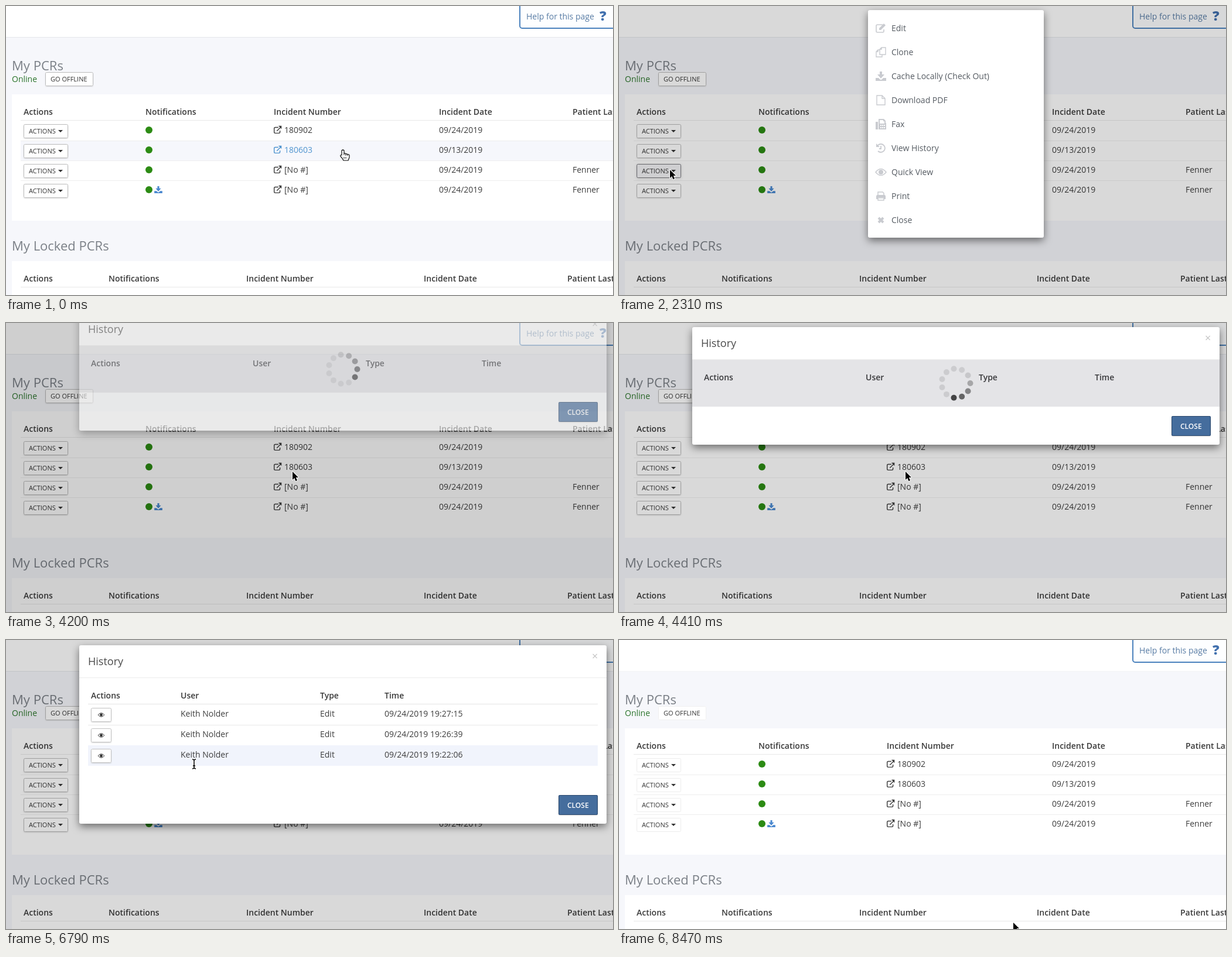
Recreate the animation shown at these times as an HTML page with a canvas. Size 1036 by 494 pixels, loop 8540 ms.

```html
<!DOCTYPE html>
<html lang="en">
<head>
<meta charset="utf-8">
<title>Record history</title>
<style>
html, body { margin: 0; width: 100%; height: 100%; overflow: hidden; background: #fff; }
canvas { display: block; }
</style>
</head>
<body>
<canvas id="stage" width="1036" height="494"></canvas>
<script>
const W = 1036, H = 494, LOOP = 8540;
const FONT = '"Open Sans", "Noto Sans", sans-serif';
const main = document.getElementById('stage').getContext('2d');
const layer = document.createElement('canvas');
layer.width = W;
layer.height = H;
const over = layer.getContext('2d');
let c = main;

const clamp = v => Math.max(0, Math.min(1, v));
const ramp = (t, start, length) => clamp((t - start) / length);
const easeOut = u => 1 - (1 - u) * (1 - u);
const smooth = u => u * u * (3 - 2 * u);

function rect(x, y, w, h, color) {
  c.fillStyle = color;
  c.fillRect(x, y, w, h);
}

function text(str, x, y, color = '#3d3d3d', size = 14, weight = 400) {
  c.font = `${weight} ${size}px ${FONT}`;
  c.fillStyle = color;
  c.fillText(str, x, y);
}

function dot(x, y, r, color) {
  c.fillStyle = color;
  c.beginPath();
  c.arc(x, y, r, 0, Math.PI * 2);
  c.fill();
}

function box(x, y, w, h, r, fill, border, shadow) {
  c.save();
  c.beginPath();
  c.roundRect(x, y, w, h, r);
  if (shadow) {
    c.shadowColor = `rgba(0,0,0,${shadow[0]})`;
    c.shadowBlur = shadow[1];
    c.shadowOffsetY = shadow[2];
  }
  c.fillStyle = fill;
  c.fill();
  c.restore();
  if (border) {
    c.strokeStyle = border;
    c.lineWidth = 1;
    c.beginPath();
    c.roundRect(x + .5, y + .5, w - 1, h - 1, r);
    c.stroke();
  }
}

// Each icon: stroked outline, filled part, line width
const ICONS = {
  edit: ['M3-6H-6Q-8-6-8-4V5Q-8 7-6 7H3Q5 7 5 5V2', 'M-3 3V0L5-8L8-5L0 3Z', 1.6],
  clone: ['M1-8H8V4H-2V-5ZM1-8V-5H-2M-2-4H-5L-8-1V8H2V4M-5-4V-1H-8', '', 1.4],
  download: ['', 'M-9 3H-4L-1 6H1L4 3H9V8H-9ZM-2-8H2V-3H6L0 4L-6-3H-2Z', 1],
  file: ['M-7-8H2L7-3V8H-7ZM2-8V-3H7', '', 1.4],
  fax: ['', 'M-9-4H-5V9H-9ZM-4-9H5L8-6V-2H9V9H-4ZM-2-7V-1H6V-5H4V-7ZM-1 1V3H1V1ZM2 1V3H4V1ZM5 1V3H7V1ZM-1 5V7H1V5ZM2 5V7H4V5ZM5 5V7H7V5Z', 1],
  history: ['M-5-5A7 7 0 1 1-5 5M0-4V1H-3', 'M-8-8V-2H-2Z', 1.8],
  eye: ['M-9 0Q0-11 9 0Q0 11-9 0Z', 'M-4 0A4 4 0 1 0 4 0A4 4 0 1 0-4 0Z', 1.6],
  print: ['M-5-1V-7H3L5-5V-1M-5 3H5V7H-5Z', 'M-8 5V1Q-8-2-6-2H6Q8-2 8 1V5H5V2H-5V5Z', 1.5],
  cross: ['M-4-4L4 4M4-4L-4 4', '', 4],
  link: ['M1-5H-5Q-7-5-7-3V4Q-7 6-5 6H2Q4 6 4 4V1M-2 2L5-5', 'M1-8H7V-2Z', 1.6]
};

function icon(name, x, y, color, scale = 1) {
  const [line, fill, width] = ICONS[name];
  c.save();
  c.translate(x, y);
  c.scale(scale, scale);
  c.strokeStyle = c.fillStyle = color;
  c.lineWidth = width;
  if (line) c.stroke(new Path2D(line));
  if (fill) c.fill(new Path2D(fill), 'evenodd');
  c.restore();
}

function actionButton(y, focus, faint) {
  const fill = focus ? '#f3f3f5' : '#fff';
  const border = faint ? '#ececec' : focus ? '#77777c' : '#bbb';
  box(30, y - 12, 76, 24, 2, fill, border, faint ? null : [.15, focus ? 5 : 2, 1]);
  text('ACTIONS', 39, y + 4, '#333', 11, 500);
  c.beginPath();
  c.moveTo(89, y - 2);
  c.lineTo(97, y - 2);
  c.lineTo(93, y + 2);
  c.fill();
}

const ROWS = [
  ['180902', '09/24/2019', ''],
  ['180603', '09/13/2019', ''],
  ['[No #]', '09/24/2019', 'Fenner'],
  ['[No #]', '09/24/2019', 'Fenner']
];

function headings(names, xs, y) {
  names.forEach((name, i) => text(name, xs[i], y, '#3a3a3a', 14, 600));
}

function page(t, cur) {
  const faint = t > 8290;
  const hover = t < 1890 ? Math.floor((cur.y - 196) / 34) : -1;
  rect(0, 0, W, H, '#f6f7fb');
  rect(0, 0, W, 53, '#fff');
  rect(0, 53, W, 1, faint ? '#f3f4f6' : '#e4e6ea');

  c.beginPath();
  c.roundRect(877, -10, 180, 48, 4);
  c.fillStyle = '#fdfeff';
  c.fill();
  c.strokeStyle = '#4b82bd';
  c.lineWidth = 2;
  c.stroke();
  text('Help for this page', 888, 23, '#587ca5');
  text('?', 1013, 25, '#4170ae', 23, 800);

  text('My PCRs', 10, 110, '#7b8087', 22);
  text('Online', 10, 130, '#2c752c');
  box(67, 113, 82, 24, 2, '#fff', faint ? '#f0f0f0' : '#bbb', faint ? null : [.12, 2, 1]);
  text('GO OFFLINE', 76, 129, '#333', 11, 500);

  rect(10, 151, W, 216, '#fff');
  headings(['Actions', 'Notifications', 'Incident Number', 'Incident Date', 'Patient Last Name'],
    [30, 238, 457, 739, 967], 186);
  rect(25, 195, W, 1, '#e8e8e8');
  ROWS.forEach(([id, date, name], i) => {
    const y = 212 + 34 * i;
    const color = i === hover ? '#4f94cf' : '#3d3d3d';
    if (i === hover) rect(25, y - 15, W, 33, '#f6f7fc');
    if (i < 3) rect(25, y + 18, W, 1, '#eee');
    const focus = i === 2 && t > 1600 && t < 3960;
    if (focus && t > 1840 && t < 2180) box(25, 268, 87, 30, 6, 'rgba(90,90,130,.08)');
    actionButton(y + 2, focus, faint);
    dot(244, y, 6, '#2c8b14');
    if (i === 3) icon('download', 260, y, '#4a88cf', .76);
    icon('link', 464, y, color, .9);
    text(id, 475, y + 5, color);
    text(date, 739, y + 5);
    text(name, 967, y + 5);
  });
  if (t > 1850 && t < 2130) {
    const u = ramp(t, 1850, 280);
    dot(87, 278, 3 + 11 * u, `rgba(70,70,70,${.5 * (1 - u)})`);
  }

  text('My Locked PCRs', 10, 418, '#7b8087', 22);
  rect(10, 436, W, 58, '#fff');
  headings(['Actions', 'Notifications', 'Incident Number', 'Incident Date', 'Patient Last Name'],
    [30, 175, 410, 713, 958], 471);
  rect(25, 480, W, 1, '#e8e8e8');
}

const MENU = [
  ['Edit', 'edit'], ['Clone', 'clone'], ['Cache Locally (Check Out)', 'download'],
  ['Download PDF', 'file'], ['Fax', 'fax'], ['View History', 'history'],
  ['Quick View', 'eye'], ['Print', 'print'], ['Close', 'cross']
];

function menu(cur) {
  box(425, 9, 300, 389, 3, '#fff', null, [.5, 14, 5]);
  const hover = cur.x > 425 ? Math.floor((cur.y - 19.5) / 41) : -1;
  MENU.forEach(([label, name], i) => {
    const y = 40 + 41 * i, on = i === hover;
    if (on) {
      rect(423, y - 20, 302, 39, '#f3f8fd');
      rect(423, y - 20, 2, 39, '#6c9bca');
    }
    icon(name, 447, y, on ? '#6f9fd0' : '#c9cbd0');
    text(label, 465, y + 5, on ? '#86abd0' : '#555b62');
  });
}

function spinner(x, y, t) {
  const n = 11, step = Math.PI * 2 / n;
  const head = 1 + (t - 4200) / 1000 * n;
  for (let i = 0; i < n; i++) {
    const lag = (((head - i) % n) + n) % n;
    const shade = .1 + .65 * Math.max(0, 1 - lag / 4.5);
    dot(x + 24.5 * Math.cos(i * step), y + 25 * Math.sin(i * step), 5, `rgba(0,0,0,${shade})`);
  }
}

const TIMES = ['19:27:15', '19:26:39', '19:22:06'];

function history(t, cur) {
  const loaded = t >= 4450;
  const bottom = loaded ? 314 : 210;
  box(125, 9, 900, bottom - 9, 3, '#fff', null, [.5, 14, 5]);
  text('History', 140, 43, '#4b4b4b', 18);
  text('×', 1000, 34, '#c4c4c4', 18);
  rect(125, 64, 900, 1, '#ececec');
  headings(['Actions', 'User', 'Type', 'Time'],
    loaded ? [145, 298, 536, 646] : [145, 421, 614, 812], 100);
  if (loaded) {
    rect(140, 109, 870, 1, '#e4e4e4');
    TIMES.forEach((time, i) => {
      const y = 126 + 35 * i;
      const on = t < 7420 && cur.y >= y - 16 && cur.y < y + 19;
      if (on) rect(140, y - 16, 870, 35, '#f1f4fc');
      if (i < 2) rect(140, y + 19, 870, 1, '#e8e8e8');
      const near = on && cur.x > 144 && cur.x < 181;
      box(145, y - 10, 35, 24, 2, '#fff', near ? '#8e8e8e' : '#c2c2c2', [.15, near ? 6 : 2, 1]);
      icon('eye', 162.5, y + 2, '#333', .6);
      text('Keith Nolder', 298, y + 5);
      text('Edit', 536, y + 5);
      text('09/24/2019 ' + time, 646, y + 5);
    });
  } else {
    rect(125, 65, 900, 80, 'rgba(50,50,75,.13)');
    spinner(575, 105, t);
  }
  const y = bottom - 49;
  const hot = loaded && cur.x > 942 && cur.y > 264;
  box(943, y, 67, 34, 2, hot ? '#4676aa' : '#456d9d', hot ? '#446f9f' : '#28466b',
    [hot ? .4 : .15, hot ? 9 : 2, hot ? 3 : 1]);
  text('CLOSE', 958, y + 21.5, '#fff', 12, 600);
}

// Draws a popup as one group so its opacity applies to the whole
function popup(draw, alpha, dy) {
  if (alpha <= 0) return;
  over.clearRect(0, 0, W, H);
  c = over;
  draw();
  c = main;
  c.globalAlpha = alpha;
  c.drawImage(layer, 0, Math.round(dy));
  c.globalAlpha = 1;
}

const TRACK = [
  [0, 575, 246], [910, 320, 258], [1050, 320, 258], [1700, 87, 280], [2420, 87, 280],
  [2940, 470, 162], [3150, 470, 162], [3360, 489, 213], [3500, 489, 254], [4660, 489, 254],
  [5320, 340, 123], [5530, 270, 127], [5950, 165, 128], [6440, 165, 195], [6600, 165, 195],
  [7280, 978, 283], [8060, 978, 283], [8470, 673, 483]
];

function cursorAt(t) {
  let i = 0;
  while (i < TRACK.length - 2 && TRACK[i + 1][0] <= t) i++;
  const [t0, x0, y0] = TRACK[i], [t1, x1, y1] = TRACK[i + 1];
  const u = smooth(ramp(t, t0, t1 - t0));
  return { x: x0 + (x1 - x0) * u, y: y0 + (y1 - y0) * u };
}

function cursorKind(t, { x, y }) {
  if (t < 1900) return 'hand';
  if (t < 3850) return x > 425 ? 'hand' : 'arrow';
  if (t < 4500 || t > 7430) return 'arrow';
  if (x > 943 && y > 265) return 'hand';
  if (y > 110 && y < 215) {
    if (x < 181) return 'hand';
    if ((x > 296 && x < 383) || (x > 534 && x < 562) || (x > 644 && x < 781)) return 'beam';
  }
  return 'arrow';
}

const ARROW = new Path2D('M0 0V14L3.2 11L5.4 16.2L8 15L5.8 10H10Z');
const HAND = new Path2D('M-2 1Q0-1 2 1V6Q4 5 5 7Q7 6 8 8Q10 7 11 9V13Q10 15 9 18H1Q0 15-4 11Q-5 8-2 9Z');
const FINGERS = new Path2D('M2 6V9M5 7V10M8 8V10M2 12V15M5 12V15');
const BEAM = new Path2D('M-3-8Q0-8 0-6Q0-8 3-8M0-6V6M-3 8Q0 8 0 6Q0 8 3 8M-2 3H2');

function pointer(kind, { x, y }) {
  c.save();
  c.translate(Math.round(x), Math.round(y));
  c.lineJoin = 'round';
  if (kind === 'arrow') {
    c.strokeStyle = '#fff';
    c.lineWidth = 2;
    c.stroke(ARROW);
    c.fillStyle = '#000';
    c.fill(ARROW);
  } else if (kind === 'hand') {
    c.fillStyle = '#fff';
    c.fill(HAND);
    c.strokeStyle = '#111';
    c.lineWidth = 1.2;
    c.stroke(HAND);
    c.lineWidth = 1;
    c.stroke(FINGERS);
  } else {
    c.strokeStyle = '#fff';
    c.lineWidth = 3;
    c.stroke(BEAM);
    c.strokeStyle = '#000';
    c.lineWidth = 1.5;
    c.stroke(BEAM);
  }
  c.restore();
}

function draw(t) {
  const cur = cursorAt(t);
  page(t, cur);

  const bump = ramp(t, 4060, 100) - ramp(t, 4260, 120);
  const dim = .15 * (ramp(t, 1900, 220) - ramp(t, 8060, 220)) + .04 * bump;
  if (dim > 0) rect(0, 0, W, H, `rgba(0,0,0,${dim})`);

  if (t > 1975 && t < 4060) {
    const alpha = ramp(t, 1975, 210) - ramp(t, 3800, 210);
    const dy = -51 * (1 - easeOut(ramp(t, 1975, 420))) - 80 * easeOut(ramp(t, 3800, 420));
    popup(() => menu(cur), alpha, dy);
  }
  if (t > 4080) {
    const alpha = ramp(t, 4080, 210) - ramp(t, 7930, 250);
    const dy = -51 * (1 - easeOut(ramp(t, 4080, 420))) - 80 * easeOut(ramp(t, 7930, 420));
    popup(() => history(t, cur), alpha, dy);
  }
  pointer(cursorKind(t, cur), cur);
}

const start = performance.now();
function tick() {
  draw((performance.now() - start) % LOOP);
  requestAnimationFrame(tick);
}
tick();
</script>
</body>
</html>
```
